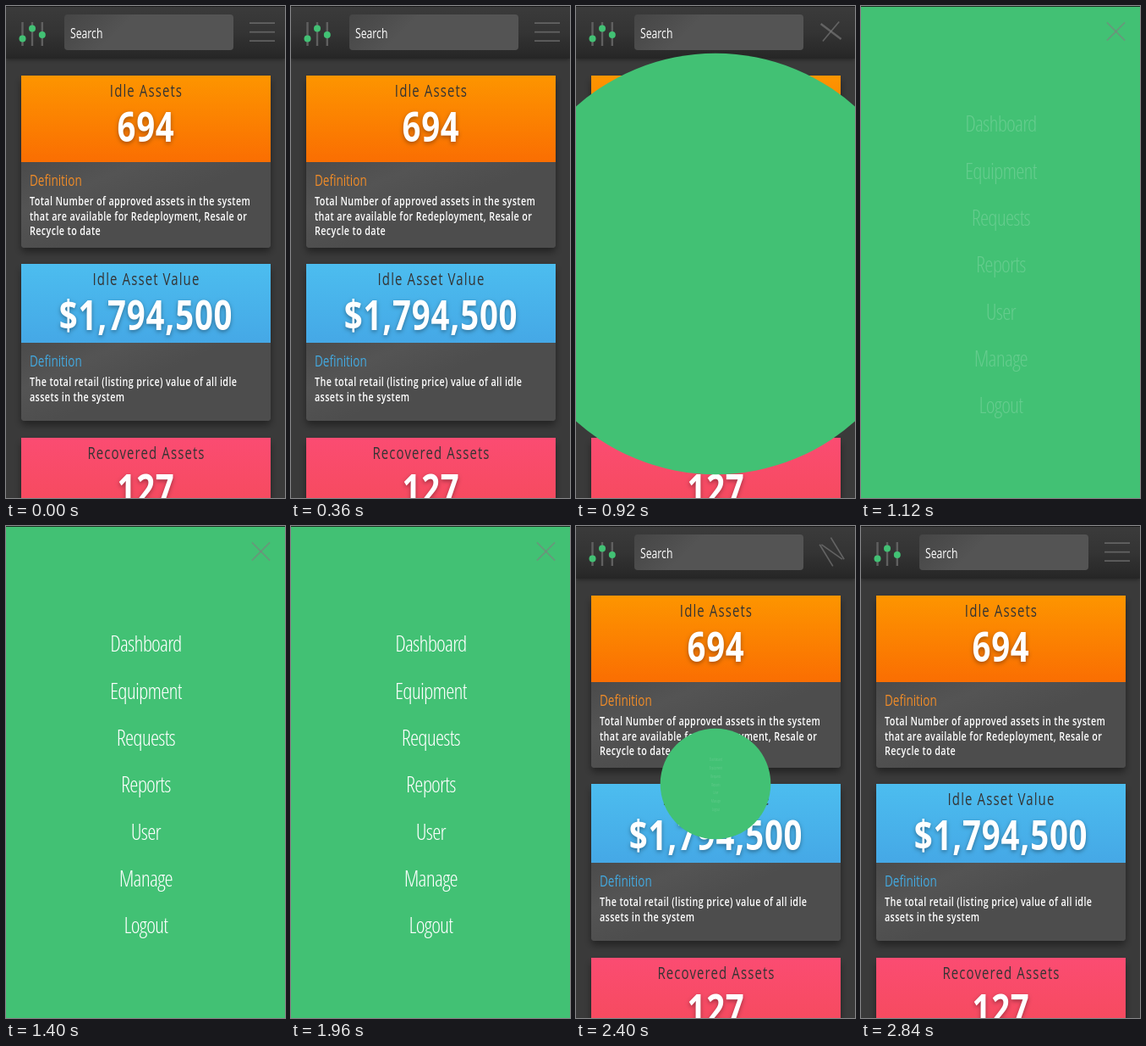
Animation of 330x580 px, one loop 2.88 s. Source, as an HTML page with a canvas:

```html
<!DOCTYPE html>
<html lang="en">
<head>
<meta charset="utf-8">
<title>Asset dashboard menu</title>
<style>
  html, body { margin: 0; width: 100%; height: 100%; overflow: hidden; background: #3a3a3a; }
  canvas { display: block; width: 330px; height: 580px; }
</style>
</head>
<body>
<canvas id="stage"></canvas>
<script>
const W = 330, H = 580, LOOP = 2880;
const GREEN = '#42c174';
const canvas = document.getElementById('stage');
const ctx = canvas.getContext('2d');
const dpr = window.devicePixelRatio || 1;
canvas.width = W * dpr;
canvas.height = H * dpr;

const MENU = ['Dashboard', 'Equipment', 'Requests', 'Reports', 'User', 'Manage', 'Logout'];
const CARDS = [
  { y: 82, split: 184, end: 285, top: '#fd9500', low: '#fa6e02', accent: '#f08c28',
    title: 'Idle Assets', value: '694',
    lines: ['Total Number of approved assets in the system',
            'that are available for Redeployment, Resale or',
            'Recycle to date'] },
  { y: 304, split: 397, end: 489, top: '#4cbdef', low: '#45a8e6', accent: '#43a9e0',
    title: 'Idle Asset Value', value: '$1,794,500',
    lines: ['The total retail (listing price) value of all idle',
            'assets in the system'] },
  { y: 509, split: 611, end: 700, top: '#fb4c72', low: '#f44a58', accent: '#f44a58',
    title: 'Recovered Assets', value: '127', lines: [] }
];

const clamp = v => Math.min(1, Math.max(0, v));
const mix = (a, b, k) => a + (b - a) * k;

// Same curve as CSS ease-in-out, cubic-bezier(.42, 0, .58, 1)
function ease(x) {
  let lo = 0, hi = 1;
  for (let i = 0; i < 22; i++) {
    const u = (lo + hi) / 2, v = 1 - u;
    if (1.26 * u * v * v + 1.74 * u * u * v + u * u * u < x) lo = u; else hi = u;
  }
  return lo * lo * (3 - 2 * lo);
}
const ramp = (t, start, length) => ease(clamp((t - start) / length));

// Narrow faces: use the condensed width, or a matching ratio if it is not installed
const RATIO = { 350: 0.71, 400: 0.74, 500: 0.75, 600: 0.77, 700: 0.8 };
const font = (weight, size, width) => `${width} ${weight} ${size}px "Open Sans", sans-serif`;
const narrow = {};
for (const weight in RATIO) {
  const measure = width => {
    ctx.font = font(weight, 40, width);
    return ctx.measureText('Assets 694').width;
  };
  narrow[weight] = measure('condensed') < measure('normal') * 0.95 ? 1 : RATIO[weight];
}

function text(str, x, y, { size, weight = 400, color = '#fff', align = 'left', gap = 0 }) {
  const k = narrow[weight];
  ctx.save();
  ctx.translate(x, y);
  ctx.scale(k, 1);
  ctx.font = font(weight, size, 'condensed');
  ctx.letterSpacing = gap / k + 'px';
  ctx.textAlign = align;
  ctx.fillStyle = color;
  ctx.fillText(str, 0, 0);
  ctx.restore();
}

function gradient(x0, y0, x1, y1, ...colors) {
  const g = ctx.createLinearGradient(x0, y0, x1, y1);
  colors.forEach((c, i) => g.addColorStop(i / (colors.length - 1), c));
  return g;
}

function box(x, y, w, h, fill, radius = 0) {
  ctx.beginPath();
  ctx.roundRect(x, y, w, h, radius);
  ctx.fillStyle = fill;
  ctx.fill();
}

function dot(x, y, r) {
  ctx.beginPath();
  ctx.arc(x, y, r, 0, Math.PI * 2);
  ctx.fillStyle = GREEN;
  ctx.fill();
}

function shadow(color, blur, dy) {
  ctx.shadowColor = color;
  ctx.shadowBlur = blur * dpr;
  ctx.shadowOffsetY = dy * dpr;
}

function drawCard(c) {
  ctx.save();
  shadow('rgba(0,0,0,.4)', 9, 5);
  box(18, c.y, 295, c.end - c.y, '#4c4c4c', 4);
  ctx.restore();
  box(18, c.split, 295, c.end - c.split,
    gradient(18, c.split, 60, c.end, '#4b4b4b', '#545454', '#4d4d4d'), [0, 0, 4, 4]);
  box(18, c.y, 295, c.split - c.y, gradient(0, c.y, 0, c.split, c.top, c.low));
  text(c.title, 166, c.y + 25, { size: 20, weight: 500, color: '#343434', align: 'center', gap: 1.1 });
  ctx.save();
  shadow('rgba(0,0,0,.35)', 5, 2);
  text(c.value, 165.5, c.y + 77.5, { size: 48, weight: 700, align: 'center', gap: 0.8 });
  ctx.restore();
  text('Definition', 28, c.split + 28, { size: 18, weight: 500, color: c.accent });
  c.lines.forEach((line, i) =>
    text(line, 28, c.split + 51 + i * 17.7, { size: 14, weight: 600, gap: 0.37 }));
}

function drawHeader() {
  ctx.save();
  shadow('rgba(0,0,0,.4)', 5, 1);
  box(0, 0, W, 62, gradient(0, 0, 0, 62, '#3b3b3b', '#343434', '#262626'));
  ctx.restore();
  [[19.5, 38.5], [31, 26.5], [42.8, 34]].forEach(([x, y]) => {
    box(x - 1.2, 19, 2.4, 28, '#606060');
    dot(x, y, 4);
  });
  box(69, 10, 200, 42, gradient(69, 10, 110, 52, '#464646', '#4c4c4c', '#545454'), 4);
  text('Search', 76, 38, { size: 16.5 });
}

function drawMenu(s, alpha) {
  if (s <= 0) return;
  dot(165, 304, 369 * s);
  if (alpha <= 0) return;
  ctx.save();
  ctx.globalAlpha = alpha;
  ctx.translate(165.3, 305);
  ctx.scale(s, s);
  MENU.forEach((item, i) =>
    text(item, 0, (i - 3) * 55.3 + 9.3, { size: 26, weight: 350, align: 'center', gap: -0.85 }));
  ctx.restore();
}

// Outer bars turn 225 degrees and meet; the middle bar turns 135 to cross them
function drawToggle(q) {
  ctx.save();
  ctx.translate(mix(303, 301.5, q), mix(30.7, 30, q));
  ctx.strokeStyle = 'rgba(128,128,128,.62)';
  ctx.lineWidth = 1.7;
  const bar = (degrees, offsets) => {
    ctx.save();
    ctx.rotate(degrees * Math.PI / 180);
    ctx.beginPath();
    offsets.forEach(y => {
      ctx.moveTo(-15, y);
      ctx.lineTo(15, y);
    });
    ctx.stroke();
    ctx.restore();
  };
  const gap = 10.5 * (1 - q);
  bar(225 * q, q < 1 ? [-gap, gap] : [0]);
  bar(135 * q, [0]);
  ctx.restore();
}

function draw(t) {
  ctx.setTransform(dpr, 0, 0, dpr, 0, 0);
  box(0, 0, W, H, '#3a3a3a');
  CARDS.forEach(drawCard);
  drawHeader();

  const open = ramp(t, 634, 476);
  const close = ramp(t, 2154.5, 348);
  const size = open - close;
  const fade = clamp((t - 1080) / 220) * Math.min(1, size * 1.15);
  drawMenu(size, fade);
  drawToggle(ramp(t, 575, 400) - ramp(t, 2194, 320));
  box(0, 0, W, 1, 'rgba(20,20,20,.85)');
}

function tick() {
  draw(performance.now() % LOOP);
  requestAnimationFrame(tick);
}
tick();
</script>
</body>
</html>
```
